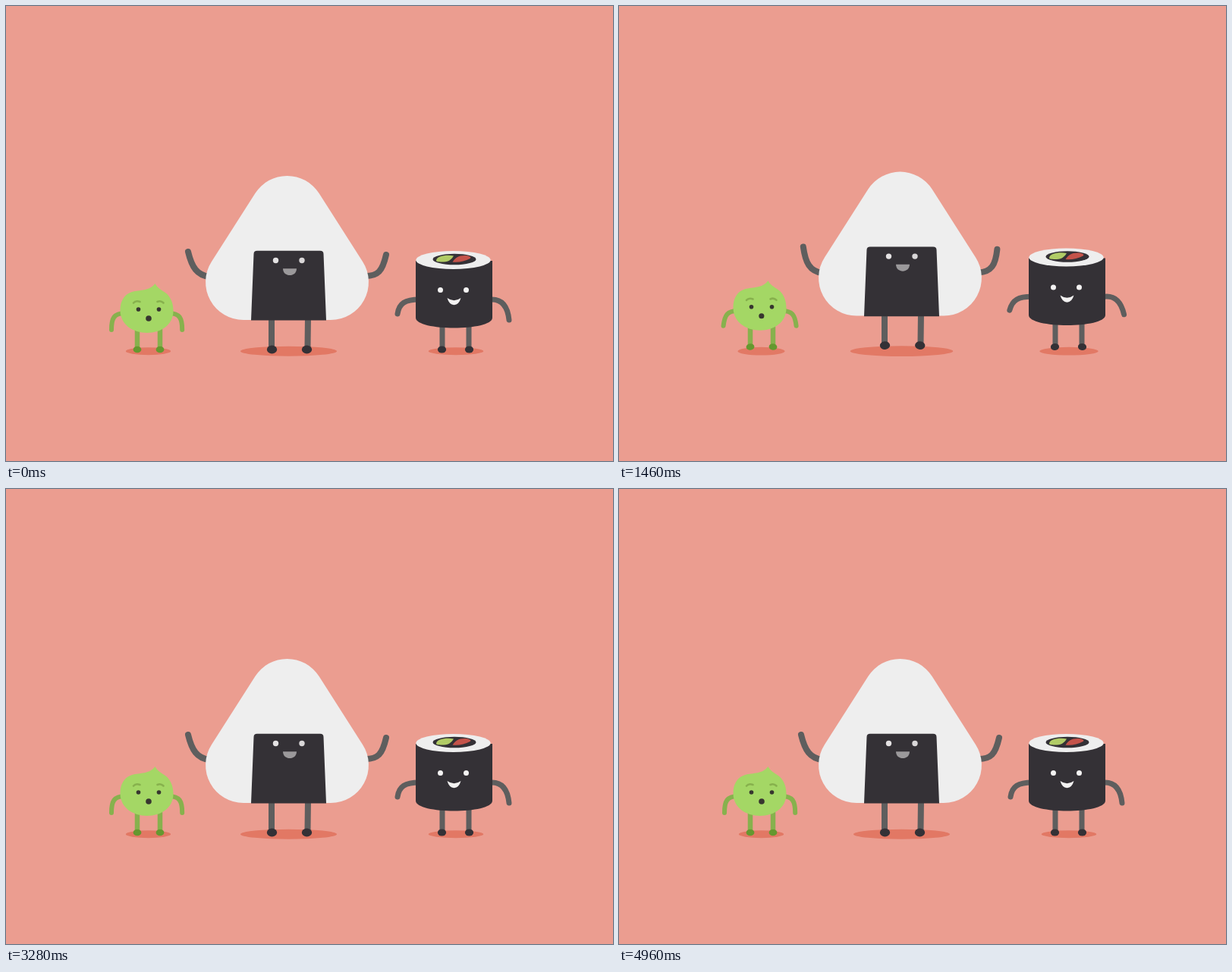
These frames come from a looping animation (800x600 px, 5 s). An HTML page with a canvas:

```html
<!DOCTYPE html>
<html lang="en">
<head>
<meta charset="utf-8">
<title>Jumping snacks</title>
<style>
  html, body { margin: 0; width: 100%; height: 100%; overflow: hidden; background: #eb9d90; }
  canvas { display: block; width: 800px; height: 600px; }
</style>
</head>
<body>
<canvas id="stage" width="800" height="600"></canvas>
<script>
const ctx = document.getElementById('stage').getContext('2d');
const CYCLE = 5000 / 3;
const INK = '#343136', RICE = '#eeeeee', LIMB = '#5e5e5e';
const GREEN = '#a4d765', STEM = '#87b14d', SHOE = '#65982f';

// Each hop: start, end, height
const HOPS = [[220, 630, 29], [670, 1060, 31], [1095, 1475, 38]];

// Crouch amount over time
const CROUCH = [
  [0, 0], [130, 1], [205, 1], [310, 0], [470, 0], [630, 1], [665, 1], [775, 0],
  [920, 0], [1055, 1], [1090, 1], [1195, 0], [1465, 0], [1530, .6], [1615, 0], [CYCLE, 0]
];

const mix = (a, b, k) => a + (b - a) * k;

function liftAt(t) {
  const hop = HOPS.find(([start, end]) => t >= start && t < end);
  if (!hop) return 0;
  const u = (t - hop[0]) / (hop[1] - hop[0]);
  return 4 * u * (1 - u) * hop[2];
}

function crouchAt(t) {
  const i = Math.max(1, CROUCH.findIndex(key => key[0] >= t));
  const [t0, a] = CROUCH[i - 1], [t1, b] = CROUCH[i];
  const u = (t - t0) / (t1 - t0);
  return mix(a, b, u * u * (3 - 2 * u));
}

function oval(x, y, rx, ry, color, turn = 0) {
  ctx.fillStyle = color;
  ctx.beginPath();
  ctx.ellipse(x, y, rx, ry, turn, 0, 7);
  ctx.fill();
}

function shape(d, color) {
  ctx.fillStyle = color;
  ctx.fill(new Path2D(d));
}

function line(d, color, width) {
  ctx.strokeStyle = color;
  ctx.lineWidth = width;
  ctx.lineCap = 'round';
  ctx.stroke(new Path2D(d));
}

// Draws inside a vertical squash anchored at the base line
function squashed(base, newBase, sx, sy, cx, draw) {
  ctx.save();
  ctx.translate(cx, newBase);
  ctx.scale(sx, sy);
  ctx.translate(-cx, -base);
  draw();
  ctx.restore();
}

function shadow(x, rx, ry, grow, air) {
  ctx.globalAlpha = 1 - .22 * Math.min(air, 1.5);
  oval(x, 455.2, rx + grow * air, ry + 1.5 * air, '#e27864');
  ctx.globalAlpha = 1;
}

// Four curve points blended from standing, airborne and crouching poses
function arm(rest, air, crouch, a, c, dy, color, width) {
  const p = rest.map((v, i) =>
    v + (air[i] - v) * a + (crouch[i] - v) * c + (i % 2 ? dy : 0));
  line(`M${p[0]} ${p[1]}C${p.slice(2)}`, color, width);
}

const shift = (p, dx, dy) => p.map((v, i) => v + (i % 2 ? dy : dx));
const mirror = (p, axis) => p.map((v, i) => i % 2 ? v : 2 * axis - v);

function leg(hip, hipY, ankle, ankleY, color, width) {
  line(`M${hip} ${hipY}L${ankle} ${ankleY}`, color, width);
}

const riceArmL = [240, 324, 245, 345, 252, 355, 268, 357];
const riceArmLUp = [252, 319, 248, 340, 249, 356, 267, 359];
const riceArmR = [501, 328, 496, 350, 490, 356, 474, 356];
const riceArmRUp = [490, 320, 497, 338, 493, 356, 474, 360];

function riceBall(lift, c, a) {
  shadow(372.5, 63.5, 6.5, 18, lift / 23);
  const base = 414 + 15 * c - lift, foot = 453 - lift;
  leg(350 - 13 * c, base - 3, 350, foot - 3, LIMB, 8);
  leg(398 + 13 * c, base - 3, 397.5, foot - 3, LIMB, 8);
  oval(350.5, foot, 6.7, 5.4, INK, -.3 * a);
  oval(396.5 + a, foot, 6.7, 5.4, INK, .3 * a);
  arm(riceArmL, riceArmLUp, shift(riceArmL, 5.5, 14), a, c, -lift, LIMB, 8);
  arm(riceArmR, riceArmRUp, shift(riceArmR, -5, 13), a, c, -lift, LIMB, 8);

  const sy = 1 - .095 * c;
  squashed(414, base, 1 - .056 * c, sy, 370.5, () => {
    shape('M328.4 247A50 50 0 0 1 412.6 247L470 337A50 50 0 0 1 428 414H313A50 50 0 0 1 271 337Z', RICE);
  });
  squashed(414, base, 1, sy, 370.5, () => {
    shape('M326.5 327Q326.6 322.8 331 322.8H414Q418.4 322.8 418.5 327L422 414.6H323Z', INK);
  });
  const face = 25.5 * c - lift;
  oval(355.5, 335.5 + face, 3.7, 3.7, '#e4e2e3');
  oval(390, 335.5 + face, 3.7, 3.7, '#d9d7d8');
  ctx.save();
  ctx.translate(0, face);
  shape('M365 346.2H383C383 358 365 358 365 346.2Z', '#9b999b');
  ctx.restore();
}

const rollArmL = [516, 406, 518, 392, 526, 387, 545, 387];
const rollArmLUp = [511, 400, 520, 387, 527, 385, 545, 386];
const rollArmR = [663, 414, 661, 394, 652, 386, 638, 387];
const rollArmRUp = [674, 398, 662, 384, 652, 381, 638, 387];

function roll(lift, c, a) {
  shadow(593, 36.3, 5, 10.5, lift / 15);
  const base = 424.5 + 10 * c - lift, foot = 453 - lift;
  leg(575 - 10 * c, base - 5, 575, foot - 3, LIMB, 7);
  leg(610 + 10 * c, base - 5, 610, foot - 3, LIMB, 7);
  oval(574.5, foot, 5.6, 4.5, INK, -.3 * a);
  oval(610.5, foot, 5.6, 4.5, INK, .3 * a);
  arm(rollArmL, rollArmLUp, shift(rollArmL, 0, 4), a, c, -lift, LIMB, 7);
  arm(rollArmR, rollArmRUp, shift(rollArmR, 0, 4.5), a, c, -lift, LIMB, 7);

  squashed(424.5, base, 1, 1 - .17 * c, 590, () => {
    shape('M540 336H641V411C641 429 540 429 540 411Z', INK);
    oval(589.5, 335, 49.2, 12, RICE);
    oval(591, 334, 28.5, 7.2, INK);
    shape('M567 336C567 330 580 327.5 590 329.5C588 333 584 337.5 577 337.5C571 337.5 567 337 567 336Z', '#b1cc66');
    shape('M588.5 337.5C592 332 597 328.5 606 329C612 329.6 613.5 331.5 611.5 333C605 336.5 596 338.5 588.5 337.5Z', '#c4534a');
    oval(572.5, 374.5, 3.5, 3.5, '#f3f2f2');
    oval(606.5, 374.5, 3.5, 3.5, '#f3f2f2');
    shape('M581.5 385Q590.5 391.5 599.5 385Q597 394 590.5 394.2Q584 394 581.5 385Z', '#f3f2f2');
  });
}

const dabArm = [139, 427, 139, 412, 142, 405, 157, 405];
const dabArmUp = [133, 420, 140, 408, 145, 406, 157, 407];
const dabArmLow = [148, 434, 139, 421, 143, 412, 153, 406];

function dab(lift, c, a) {
  shadow(187.5, 29.7, 5, 6, lift / 15);
  const air = lift / 15;
  const stretch = Math.min(.65 * air * air, .75) * (1 - c);
  const s = c - stretch;
  const base = 431 + 1.5 * s - lift + air, foot = 453 - lift;
  leg(173 - 5 * c, base - 4, 173, foot - 3, STEM, 6.5);
  leg(203 + 5 * c, base - 4, 203, foot - 3, STEM, 6.5);
  oval(173, foot, 5.4, 4.3, SHOE, -.2 * a);
  oval(203, foot, 5.4, 4.3, SHOE, .2 * a);
  const low = Math.max(0, s);
  for (const side of [p => p, p => mirror(p, 185.6)])
    arm(side(dabArm), side(dabArmUp), side(dabArmLow), a, low, -lift, STEM, 6);

  squashed(431, base, 1, 1 - .165 * s, 185.5, () => {
    shape('M196.5 366C199 371 204 374 210 378C217 383 220.5 392 220.5 402C220.5 420 205 431 186 431C167 431 150.5 420 150.5 401C150.5 389 156 380 166 377C177 374 189 376 196.5 366Z', GREEN);
    line('M168 391.5Q171 388 176.5 390', STEM, 2.6);
    line('M199.5 390Q204 388 207.5 391.5', STEM, 2.6);
  });
  const face = 6 * s - lift + 1.5 * air + 2.5 * stretch;
  oval(174.5, 400 + face, 2.8, 2.8, '#37352f');
  oval(201.5, 400 + face, 2.8, 2.8, '#37352f');
  const mouth = 3.8 - Math.min(air, 1.2);
  oval(188 - .8 * a, 412 + face, mouth, mouth, '#37352f');
}

function draw(now) {
  const t = now % CYCLE;
  const lift = liftAt(t), c = crouchAt(t);
  const a = Math.min(lift / 23, 1.1);
  ctx.fillStyle = '#eb9d90';
  ctx.fillRect(0, 0, 800, 600);
  dab(lift * .65, c, a);
  riceBall(lift, c, a);
  roll(lift * .65, c, a);
}

const begin = performance.now();
function tick() {
  draw(performance.now() - begin);
  requestAnimationFrame(tick);
}
tick();
</script>
</body>
</html>
```
